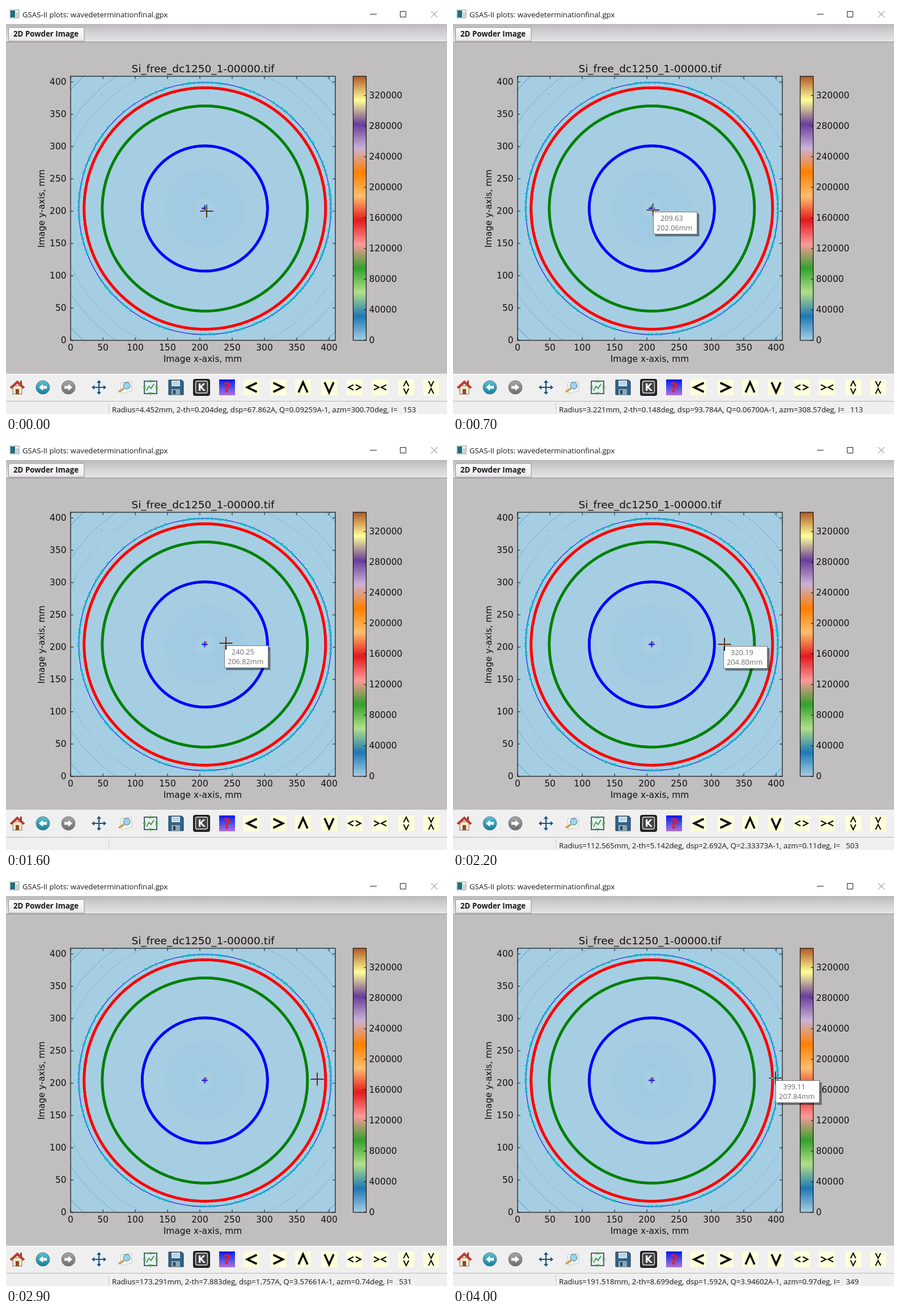
An HTML page for the animation above (4100 ms loop, 778 by 720 pixels).

```html
<!DOCTYPE html>
<html lang="en">
<head>
<meta charset="utf-8">
<title>2D Powder Image</title>
<style>
  html, body { margin: 0; width: 100%; height: 100%; overflow: hidden; background: #c0bebf; }
  svg { display: block; width: 778px; height: 720px; }
  text { white-space: pre; }
  .ui { font: 13.2px "Open Sans", sans-serif; fill: #1a1a1a; }
  .plot { font: 15.4px "DejaVu Sans", sans-serif; fill: #111; }
  .mid { text-anchor: middle; }
  .end { text-anchor: end; }
  .tip { font: 12.7px "Open Sans", sans-serif; fill: #6c6c6c; }
  #cursor { mix-blend-mode: difference; }
</style>
</head>
<body>
<svg id="stage" viewBox="0 0 778 720" xmlns="http://www.w3.org/2000/svg"></svg>
<script>
const PX = 1.14, LEFT = 114, BASE = 590, SIDE = 467, TOP = BASE - SIDE;
const CX = 350.8, CY = 357.3;
const px = mm => LEFT + PX * mm;
const py = mm => BASE - PX * mm;

const rect = (x, y, w, h, fill, more = '') =>
  `<rect x="${x}" y="${y}" width="${w}" height="${h}" fill="${fill}" ${more}/>`;
const circle = (x, y, r, more) => `<circle cx="${x}" cy="${y}" r="${r}" ${more}/>`;
const path = (d, color, w = 1, more = '') =>
  `<path d="${d}" fill="none" stroke="${color}" stroke-width="${w}" ${more}/>`;
const shape = (d, fill, more = '') => `<path d="${d}" fill="${fill}" ${more}/>`;
const label = (x, y, s, cls, more = '') => `<text x="${x}" y="${y}" class="${cls}" ${more}>${s}</text>`;
const at = (x, y, body) => `<g transform="translate(${x} ${y})">${body}</g>`;
const range = (n, f) => Array.from({ length: n }, (_, i) => f(i)).join('');
const ramp = (id, dir, colors) => `<linearGradient id="${id}" ${dir}>` +
  colors.map((c, i) => `<stop offset="${i / (colors.length - 1)}" stop-color="${c}"/>`).join('') +
  '</linearGradient>';

let seed = 11;
const rand = () => (seed = (seed * 16807) % 2147483647) / 2147483647;

function defs() {
  const paired = ['#a6cee3', '#1f78b4', '#b2df8a', '#33a02c', '#fb9a99', '#e31a1c',
    '#fdbf6f', '#ff7f00', '#cab2d6', '#6a3d9a', '#ffff99', '#b15928'];
  const down = 'x1="0" y1="0" x2="0" y2="1"';
  return '<defs>' +
    ramp('bar', 'x1="0" y1="1" x2="0" y2="0"', paired) +
    ramp('strip', down, ['#bcbabc', '#d4d2d4', '#e6e4e6']) +
    ramp('tab', down, ['#ffffff', '#f4f3f4', '#e8e6e8']) +
    ramp('help', down, ['#0a18f0', '#4a50e8', '#b070d8']) +
    ramp('teal', down, ['#5cc0d8', '#137f9c']) +
    ramp('grey', down, ['#a8a8a8', '#6c6c6c']) +
    `<radialGradient id="halo">
      <stop offset="0" stop-color="#a6cee3"/><stop offset=".2" stop-color="#a6cee3"/>
      <stop offset=".25" stop-color="#9fcae1"/><stop offset=".8" stop-color="#a1cbe2"/>
      <stop offset="1" stop-color="#a6cee3"/></radialGradient>
    <clipPath id="clip">${rect(LEFT, TOP, SIDE, SIDE, '#000')}</clipPath></defs>`;
}

function frame() {
  return rect(0, 0, 778, 720, '#c0bebf') +
    rect(0, 0, 778, 32, '#fff') +
    rect(7, 7, 16, 14, '#f4f4f4', 'stroke="#8b9296"') +
    rect(8, 8, 8, 12, '#1d6f78') + rect(17, 11, 5, 9, '#c9d4d8') +
    label(29, 20, 'GSAS-II plots: wavedeterminationfinal.gpx', 'ui') +
    path('M642 14.5h12', '#222') + path('M695.5 9.5h10v10h-10z', '#222') +
    path('M750 9l11 11M761 9l-11 11', '#a8a8a8', 1.1) +
    rect(0, 32, 778, 32, 'url(#strip)') + path('M0 32.5H778', '#b0aeb0') +
    path('M0 63.5H778', '#8e8c8e') +
    shape('M4.500 62V41q0-3 3-3H135q3 0 3 3V62z', 'url(#tab)', 'stroke="#949294"') +
    label(13, 54, '2D Powder Image', 'ui', 'style="font-weight:700;font-size:13.3px"') +
    rect(0, 649, 778, 71, '#f0eff0') + path('M0 649.5H778', '#fafafa') +
    path('M0 697.5H778', '#b4b2b4') + path('M181.500 700V720', '#cfcdcf');
}

function rings() {
  const ring = (r, color, w, more = '') => circle(CX, CY, r, `fill="none" stroke="${color}" stroke-width="${w}" ${more}`);
  // Degrees clockwise from the top, first and last of each dotted arc
  const arcs = [[-10, 11], [17, 27], [33, 47], [51, 60], [63, 76], [79, 97], [100, 115], [121, 142],
    [145, 159], [162, 171], [176, 184], [197, 203], [209, 210], [216, 221], [225, 236],
    [249, 261], [265, 283], [286, 295], [298, 306], [310, 312], [320, 322], [326, 328], [332, 343]];
  let dots = '';
  for (const [a, b] of arcs) {
    for (let d = a; d <= b; d += 1.1 + rand() * 2) {
      const q = d * Math.PI / 180, r = 221.9 + rand();
      dots += circle((CX + r * Math.sin(q)).toFixed(1), (CY - r * Math.cos(q)).toFixed(1), 2.3, '');
    }
  }
  const beads = 'stroke-linecap="round" stroke-dasharray="0 3.6"';
  const thick = (r, color) => ring(r, color, 4.2) + ring(r, color, 5.2, beads);
  return ring(257, '#7db3d5', 0.8) + ring(280.5, '#6aa7cf', 0.9) + ring(316.4, '#4c93c3', 1) +
    circle(CX, CY, 78, 'fill="url(#halo)"') +
    rect(168, 155, 1.5, 1.5, '#6d7f86') + rect(536, 164, 1.2, 1.2, '#7c93a0') +
    ring(222.4, '#2a2aee', 1.3) + `<g fill="#00bfc0">${dots}</g>` +
    thick(213, '#f00') + thick(181, '#008000') + thick(110.5, '#00f') +
    path('M345 357h11M350.500 351.500v11', '#2020f0', 1.8) +
    path('M347.500 354l6 6M353.500 354l-6 6', '#2a2ad8', 1) + circle(353, 353.5, 1.4, 'fill="#e33a3a"');
}

function plot() {
  const ticks = range(9, i => {
    const v = i * 50, x = px(v), y = py(v);
    return path(`M${x} ${BASE}v-5M${x} ${TOP + 1}v5M${LEFT} ${y}h5M${LEFT + SIDE} ${y}h-5`, '#111') +
      label(x, 607.5, v, 'plot mid') + label(106.500, y + 5, v, 'plot end');
  });
  const scale = range(9, i => {
    const y = BASE - i * 54;
    return path(`M636 ${y}h-5`, '#111') + label(640.5, y + 5, i * 40000, 'plot');
  });
  return rect(LEFT, TOP, SIDE, SIDE, '#a6cee3') + `<g clip-path="url(#clip)">${rings()}</g>` +
    rect(LEFT, TOP + 1, SIDE, SIDE - 1, 'none', 'stroke="#111" stroke-width="1.2"') +
    rect(612.5, TOP + 1, 23, SIDE - 1, 'url(#bar)', 'stroke="#111" stroke-width="1.2"') + ticks + scale +
    label(347.5, 116.5, 'Si_free_dc1250_1-00000.tif', 'plot mid', 'style="font-size:18.5px"') +
    label(347, 628, 'Image x-axis, mm', 'plot mid') +
    label(0, 0, 'Image y-axis, mm', 'plot mid', 'transform="translate(68 357.5) rotate(-90)"');
}

function toolbar() {
  const arrow = 'M-7 0l7-6v3.500h7v5h-7v3.500z';
  const round = (fill, turn) => circle(0, 0, 12, `fill="url(#${fill})" stroke="#5b6b70" stroke-width=".8"`) +
    shape(arrow, '#fff', `transform="rotate(${turn})"`);
  const home = rect(-8, -3, 16, 15, '#f3e6cf', 'stroke="#8a6a4c"') + rect(-3, 3, 6, 9, '#8a4a22') +
    rect(5, -12, 3, 7, '#a33a2a') + shape('M-13 0L0-12L13 0L10 2L0-7L-10 2z', '#c43c30', 'stroke="#8e241c" stroke-width=".7"');
  const move = path('M-9 0H9M0-9V9', '#1d5482', 2.2) +
    [0, 90, 180, 270].map(a => shape('M-4-8h8L0-13z', '#1d5482', `transform="rotate(${a})"`)).join('');
  const zoom = shape('M-8-8L11-11L12 6L-6 11z', '#f8f8f6', 'stroke="#c6c6c2"') +
    circle(3, -3, 6, 'fill="#9cd4ea" stroke="#6a98ac" stroke-width="1.3"') + path('M-2 2L-11 8', '#d49a4c', 3.6);
  const adjust = rect(-11, -11, 22, 22, '#e8f0f4', 'stroke="#4a6472" stroke-width="2"') +
    path('M-7 6l4-8 4 4 5-8', '#2c8a3c', 1.6) +
    [0, 90, 180, 270].map(a => shape('M-4-9h8L0-14z', '#58a84a', `transform="rotate(${a})"`)).join('');
  const save = shape('M-13-13H10l3 3V13H-13z', '#2f6288', 'stroke="#1b3c58"') +
    rect(-8, -12, 15, 10, '#d8e4ec') + rect(-8, 3, 15, 10, '#8fa4b2') + rect(-5, 5, 4, 7, '#24465f') +
    path('M-6-9h11M-6-6h11', '#93a8b6');
  const bold = (s, size, fill, y) =>
    `<text y="${y}" class="mid" fill="${fill}" style="font:700 ${size}px 'DejaVu Sans',sans-serif">${s}</text>`;
  const key = rect(-14.5, -14.5, 29, 29, '#2a2a2c', 'rx="3" stroke="#111"') +
    rect(-10.5, -11, 21, 21, '#434347', 'rx="3" stroke="#e8e8e8" stroke-width="1.3"') + bold('K', 17, '#fff', 6);
  const help = rect(-14, -14, 28, 28, 'url(#help)') + bold('?', 25, '#f01818', 9);
  const chevron = (d, w) => rect(-14, -14, 28, 28, '#ffffdc') + path(d, '#0a0a0a', w);
  const icons = [
    [20, home], [65, round('teal', 0)], [110, round('grey', 180)], [164, move], [210, zoom],
    [255, adjust], [300, save], [345, key], [390, help],
    [433, chevron('M9.500-8L-7.500 0L9.500 8', 3.6)], [481, chevron('M-9.500-8L7.500 0L-9.500 8', 3.6)],
    [524, chevron('M-8 9L0-9L8 9', 3.6)], [570, chevron('M-8-9L0 9L8-9', 3.6)],
    [615, chevron('M-2-4.500L-11 0L-2 4.500M2-4.500L11 0L2 4.500', 2)],
    [660, chevron('M-11-4.500L-2 0L-11 4.500M11-4.500L2 0L11 4.500', 2)],
    [706, chevron('M-4.500-2L0-11L4.500-2M-4.500 2L0 11L4.500 2', 2)],
    [750, chevron('M-4.500-11L0-2L4.500-11M-4.500 11L0 2L4.500 11', 2)]
  ];
  return icons.map(([x, body]) => at(x, 673, body)).join('');
}

const stage = document.getElementById('stage');
stage.innerHTML = defs() + frame() + plot() + toolbar() +
  label(187, 717, '', 'ui', 'id="status"') +
  `<g id="tip">${rect(4, 4, 78, 40, '#000', 'opacity=".2"') + rect(3, 3, 78, 40, '#000', 'opacity=".3"') +
    rect(0.5, 0.5, 77, 39, '#fff', 'stroke="#777"') +
    label(13, 16, '', 'tip', 'id="tipX"') + label(6, 33, '', 'tip', 'id="tipY"')}</g>` +
  path('M-11.500 0h23M0-11.500v23', '#fff', 2, 'id="cursor"');
const [status, tip, tipX, tipY, cursor] =
  ['status', 'tip', 'tipX', 'tipY', 'cursor'].map(id => document.getElementById(id));

// Pauses of the pointer: from, to (ms), position (mm), tip shift (px), readout
const stops = [
  { from: 0, to: 600, x: 209.89, y: 200.75, dx: 0, dy: 2, read: '4.452 0.204 67.862 0.09259 300.70 153' },
  { from: 900, to: 1200, x: 208.88, y: 205.81, dx: 0, dy: 4, read: '1.762 0.081 171.443 0.03665 44.32 -2' },
  { from: 1500, to: 1700, x: 240.25, y: 206.82, dx: -3, dy: 4, read: '' },
  { from: 2100, to: 2300, x: 320.19, y: 204.8, dx: -2, dy: 3, read: '112.565 5.142 2.692 2.33373 0.11 503' },
  { from: 2700, to: 2900, x: 380.9, y: 206.82, dx: 0, dy: 4, read: '173.291 7.883 1.757 3.57661 0.74 531' },
  { from: 3400, to: 4100, x: 399.11, y: 207.84, dx: 0, dy: 4, read: '191.518 8.699 1.592 3.94602 0.97 349' }
];
const fades = [[0, 0], [300, 0], [600, 1], [2300, 1], [2500, 0], [3500, 0], [3800, 1], [4100, 1]];
const LOOP = 4100, STEP = 100;
const mix = (a, b, k) => a + (b - a) * k;

function tipAlpha(t) {
  const i = fades.findIndex(f => f[0] > t), [a, p] = fades[i - 1], [b, q] = fades[i];
  return mix(p, q, (t - a) / (b - a));
}

// Diffraction geometry around the beam centre
function measure(x, y, count) {
  const dx = x - 207.62, dy = y - 204.58, r = Math.hypot(dx, dy);
  const angle = Math.atan(r / (1250.7 + 2.8e-5 * r * r));
  const d = 0.241515 / (2 * Math.sin(angle / 2));
  const azm = (Math.atan2(dy, dx) * 180 / Math.PI + 360) % 360;
  return [r.toFixed(3), (angle * 180 / Math.PI).toFixed(3), d.toFixed(3),
    (2 * Math.PI / d).toFixed(5), azm.toFixed(2), Math.round(count)].join(' ');
}

function readout(read) {
  if (!read) return '';
  const [r, th, d, q, azm, n] = read.split(' ');
  return `Radius=${r}mm, 2-th=${th}deg, dsp=${d}A, Q=${q}A-1, azm=${azm}deg, I=${n.padStart(6)}`;
}

function pose(t) {
  const i = stops.findIndex(s => t <= s.to), b = stops[i];
  if (t >= b.from) return b;
  const a = stops[i - 1], u = (t - a.to) / (b.from - a.to), k = u * u * (3 - 2 * u);
  const p = {};
  for (const key of ['x', 'y', 'dx', 'dy']) p[key] = mix(a[key], b[key], k);
  const count = s => Number(s.read.split(' ')[5] || 480);
  p.read = t >= 1300 && t <= 1800 ? '' : measure(p.x, p.y, mix(count(a), count(b), k));
  return p;
}

function draw(now) {
  const t = Math.floor(now % LOOP / STEP) * STEP, p = pose(t);
  const x = Math.round(px(p.x) + 0.4), y = Math.round(py(p.y) + 0.4);
  cursor.setAttribute('transform', `translate(${x} ${y})`);
  tip.setAttribute('transform', `translate(${x + Math.round(p.dx)} ${y + Math.round(p.dy)})`);
  tip.setAttribute('opacity', tipAlpha(t));
  tipX.textContent = p.x.toFixed(2);
  tipY.textContent = p.y.toFixed(2) + 'mm';
  status.textContent = readout(p.read);
}

const start = performance.now();
function tick() {
  draw(performance.now() - start);
  requestAnimationFrame(tick);
}
tick();
</script>
</body>
</html>
```
